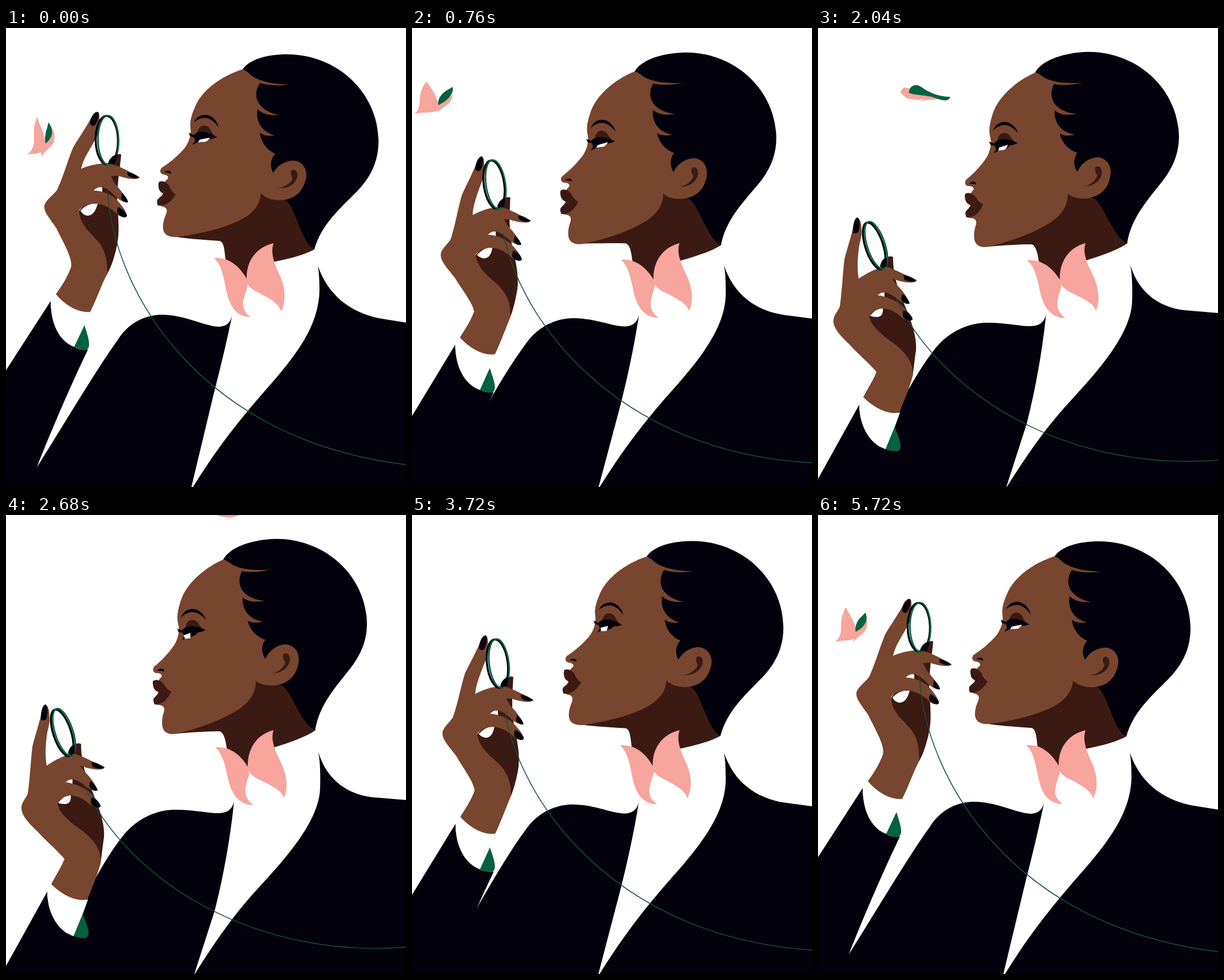
An HTML page that plays this animation: 698x802 px, repeating every 5760 ms.

```html
<!DOCTYPE html>
<html lang="en">
<head>
<meta charset="utf-8">
<title>Portrait with lens and butterfly</title>
<style>
  html, body { margin: 0; width: 100%; height: 100%; overflow: hidden; background: #fff; }
  svg { display: block; width: 698px; height: 802px; }
  .ink { fill: #02010c; }
  .skin { fill: #78452e; }
  .shade { fill: #3b1a14; }
  .pink { fill: #f7a59d; }
  .green { fill: #00623f; }
  .white { fill: #fff; }
  .cord { fill: none; stroke: #14503a; stroke-width: 1.5; }
  .rim { fill: none; }
</style>
</head>
<body>
<svg viewBox="0 0 698 802">
  <g id="body"></g>
  <g id="head">
    <path class="skin" d="M413 72C375 84 340 110 329 140C321 158 321 168 322 176C324 190 316 206 308 214C295 228 283 237 272 244C267 249 269 255 275 256C283 257 286 262 279 266C274 272 276 290 276 300C276 308 274 310 267 311C280 312 283 317 279 326C274 337 272 350 276 357C280 364 290 366 300 365C345 359 385 348 410 335C432 324 444 307 445 289L500 270L520 250L520 85L440 75Z"/>
    <path class="ink" d="M413 72C425 55 455 46 490 46C580 46 650 115 650 198C650 235 635 262 612 286C578 320 550 345 538 387C518 375 510 335 497 312C492 302 486 299 480 300L505 250L467 254C460 245 461 228 470 220C455 213 445 200 443 183C450 188 458 189 469 188C448 182 435 165 439 142C450 152 462 153 477 152C448 147 425 125 443 96C458 101 475 101 494 99C470 98 445 95 428 83C422 77 418 74 413 72Z"/>
    <path class="skin" d="M445 289L450 250L466 254C472 240 490 230 505 232C520 235 527 250 523 265C518 285 505 300 478 301C462 301 450 295 445 289Z"/>
    <path class="shade" d="M499 248C507 245 511 255 507 264C502 275 490 281 475 280C488 278 498 270 500 262C497 260 496 250 499 248Z"/>
    <path class="ink" d="M328 165C333 154 342 151 350 152C361 153 369 164 371 174C365 165 358 158 348 157C340 157 333 160 328 165Z"/>
    <path class="shade" d="M334 182C338 168 350 168 356 176C360 184 363 190 370 191C355 193 345 190 334 182Z"/>
    <path class="ink" d="M319 183L328 187C334 178 352 180 368 191C360 194 357 194 355 193C350 199 340 201 334 200L325 204L330 197L328 191L321 189Z"/>
    <path class="ink" d="M276 252C281 247 289 249 288 255C284 252 280 253 276 252Z"/>
    <path class="shade" d="M267 269C275 265 284 272 286 279C289 286 293 288 296 291C289 302 280 312 265 310C263 305 263 300 266 298C270 295 274 291 274 289C266 285 266 279 266 272Z"/>
    <g id="eye"></g>
  </g>
  <g id="bow"></g>
  <g id="fly"></g>
  <g id="hand"></g>
  <g id="lens">
    <ellipse class="rim" id="rimBack" stroke="#02010c" stroke-width="3.6" ry="42.5"/>
    <ellipse class="rim" id="rimFront" stroke="#00623f" stroke-width="2.7" cx="1.5" ry="43"/>
  </g>
  <g id="nails"></g>
</svg>
<script>
const LOOP = 5760;
const $ = id => document.getElementById(id);
const lerp = (a, b, k) => a + (b - a) * k;
const clamp = u => Math.max(0, Math.min(1, u));
const smooth = u => u * u * (3 - 2 * u);
const cubic = u => u < .5 ? 4 * u ** 3 : 1 - 4 * (1 - u) ** 3;
const ramp = (t, from, to) => cubic(clamp((t - from) / (to - from)));

// Blend two paths that share the same commands
function mix(a, b, k) {
  const nums = b.match(/-?[\d.]+/g);
  let i = 0;
  return a.replace(/-?[\d.]+/g, n => lerp(+n, +nums[i++], k).toFixed(2));
}

function addPath(layer, cls) {
  const el = document.createElementNS('http://www.w3.org/2000/svg', 'path');
  el.setAttribute('class', cls);
  $(layer).append(el);
  return el;
}

const parts = [];
function part(layer, cls, driver, raised, lowered) {
  parts.push({ el: addPath(layer, cls), driver, raised, lowered });
}

// Neck, running up behind jaw and hair
part('body', 'shade', 'head',
  'M285 363C330 340 400 310 445 280L500 290C515 320 525 350 538 387C520 397 490 404 465 409L421 440C405 420 390 412 383 404C381 385 380 373 372 372C345 370 310 368 285 363Z',
  'M298 382C335 350 400 320 437 280L490 285C515 320 525 350 540 376C525 387 495 398 465 407L422 440C405 420 390 415 385 407C383 390 379 380 373 378C350 378 320 380 298 382Z');
// Sleeve
part('body', 'ink', 'arm',
  'M0 598L78 477C78 520 95 548 119 557C127 562 134 563 143 562C122 605 75 710 40 804L0 804Z',
  'M0 788L72 658C72 692 88 726 118 736C126 739 134 739 142 739C132 760 120 785 110 804L0 804Z');
// Jacket, left and right of the shirt
part('body', 'ink', 'arm',
  'M20 820C80 730 145 615 195 545C215 513 245 501 273 501C315 502 345 521 372 522C385 521 392 515 395 500C386 545 375 590 363 637L323 804Z',
  'M60 830C95 760 150 630 200 566C226 530 263 515 295 515C330 515 350 521 370 521C385 521 395 515 398 500C392 560 380 630 364 692L328 804Z');
part('body', 'ink', 'arm',
  'M544 415C562 467 600 496 650 507L699 515L699 804L325 804C380 715 425 665 470 613C515 560 545 515 547 460C547 440 546 425 544 415Z',
  'M545 414C560 465 600 492 650 494L699 498L699 804L328 804C365 745 400 695 442 650C490 598 545 535 548 480C549 450 548 430 545 414Z');
// Cuff and cufflink
part('body', 'white', 'arm',
  'M78 476C78 520 95 548 119 557L137 519L147 496L87 465Z',
  'M72 656C72 692 88 726 118 736L134 697L143 672L79 645Z');
part('body', 'green', 'arm',
  'M137 519C140 530 146 545 145 555C144 559 143 561 140 563C132 563 125 560 119 557Z',
  'M134 697C137 707 144 720 144 730C144 736 142 738 139 739C131 740 124 738 118 736Z');
// Bow
part('bow', 'pink', 'head',
  'M363 402C387 400 406 414 420 438C423 447 422 451 420 456C414 476 407 490 427 505C405 505 392 490 386 465C380 440 378 415 363 402Z',
  'M365 406C389 404 408 417 422 440C425 449 425 452 423 457C417 477 412 492 432 507C410 507 396 492 389 467C383 442 380 418 365 406Z');
part('bow', 'pink', 'head',
  'M467 376C460 395 471 417 479 435C488 457 489 478 480 496C478 480 450 467 434 459C421 451 420 445 420 438C419 408 436 383 467 376Z',
  'M467 376C460 395 473 417 481 435C491 457 492 478 485 495C483 480 453 468 437 460C424 452 423 446 422 439C421 410 437 383 467 376Z');
// Eye white
part('eye', 'white', 'gaze',
  'M338 195L356 191.5C353 196 350 199 346 199L335 200Z',
  'M329 196L341 193C341 196 341 199 340 202L331 202Z');
// Thumb, finger gaps, hand
part('hand', 'shade', 'arm',
  'M180 236C185 226 194 218 201 221C199 245 194 270 194 300C196 340 200 360 190 395C186 410 182 420 176 431C178 400 165 378 150 362C135 348 128 334 127 320L160 280Z',
  'M109 416C113 405 122 396 131 400C131 425 135 440 143 465C158 500 176 540 170 570C168 585 167 595 165 609C163 580 140 555 122 545C105 535 92 522 88 505L112 470Z');
part('hand', 'white', 'arm',
  'M153 284C158 276 164 276 168 279L168 290C163 286 158 284 153 284Z',
  'M104 467C108 461 113 460 116 462L116 474C112 469 108 467 104 467Z');
part('hand', 'white', 'arm',
  'M130 319C140 308 152 305 160 307C157 318 152 328 142 328C136 327 132 323 130 319Z',
  'M91 503C98 494 106 489 113 490C114 497 112 504 104 505C98 505 94 504 91 503Z');
part('hand', 'skin', 'arm',
  'M87 465C100 447 108 433 113 419C118 405 100 375 88 350C75 331 67 322 67 313C66 303 82 293 89 283C100 260 107 233 117 209C125 195 141 172 148 158C152 149 157 145 161 147C165 151 162 165 162 178C161 186 157 193 154 198C146 213 135 228 131 246C145 240 165 235 182 237C200 242 218 252 233 261C230 266 212 264 198 259C192 257 186 260 183 258L190 272C198 281 206 290 213 304C208 306 200 302 194 297C186 289 175 278 166 278C160 278 156 281 153 284C165 284 180 289 190 297C200 307 208 317 211 327C211 333 203 331 196 327C183 314 170 307 155 307C143 307 132 311 127 319C129 342 145 357 160 372C172 386 178 405 176 431C165 452 160 470 147 496C125 498 103 484 87 465Z',
  'M79 645C88 628 97 614 102 601C92 588 70 570 55 553C38 537 28 525 27 514C26 503 34 496 38 487C42 460 43 430 46 405C49 392 57 367 61 350C64 335 67 331 70 332C76 336 76 348 76 360C75 368 73 375 72 380C69 400 68 420 71 438C85 428 104 418 120 417C139 424 156 433 172 441C170 447 152 445 138 441C134 438 131 440 129 437L135 446C146 457 155 468 160 481C156 483 146 480 140 475C131 467 122 462 115 462C110 462 107 465 104 467C117 468 130 474 142 481C153 491 162 501 165 508C165 513 156 511 149 508C135 495 125 491 113 490C103 491 94 495 89 503C93 522 112 537 135 553C155 570 167 585 165 609C158 633 150 652 142 672C122 676 98 664 79 645Z');
part('hand', 'cord', 'arm',
  'M177 280C185 460 340 720 698 763',
  'M135 470C215 644 440 776 698 755');
// Nails: index, middle, ring, little, thumb
part('hand', 'ink', 'arm',
  'M147 168C146 158 155 145 161 147C163 152 160 164 155 170C152 172 148 171 147 168Z',
  'M61 358C60 345 64 331 69 331C73 334 74 350 70 357C67 359 63 359 61 358Z');
part('nails', 'ink', 'arm',
  'M211 252C219 252 227 257 233 261C227 264 219 262 213 258Z',
  'M149 432C158 432 166 437 172 441C167 445 157 443 151 440Z');
part('nails', 'ink', 'arm',
  'M202 288C207 292 211 297 213 304C208 306 203 302 201 298Z',
  'M147 465C153 469 158 475 160 481C156 484 148 480 145 474Z');
part('nails', 'ink', 'arm',
  'M196 313C204 317 209 322 211 327C211 333 202 331 196 326C193 322 194 316 196 313Z',
  'M150 493C158 497 163 502 165 508C164 513 157 512 150 507C147 502 148 497 150 493Z');
part('nails', 'ink', 'arm',
  'M178 236C182 226 188 221 195 222C193 229 191 236 188 238Z',
  'M108 417C110 408 114 401 120 402C120 409 120 415 119 417Z');

// Butterfly wings: seen from the side, spread, flat; each about its own centre
const wings = [
  { cls: 'pink',
    side: 'M55 155C58 172 68 182 68 200C70 186 76 176 79 174C87 182 86 200 79 206C73 212 66 216 62 227C63 222 62 218 60 217C54 221 45 219 36 222C46 215 50 206 49 190C48 175 50 165 55 155Z',
    spread: 'M25 94C33 103 42 117 46 133C52 130 62 122 71 117C70 126 66 130 60 135C54 140 48 143 40 150C43 147 45 145 47 143C34 150 20 146 4 150C14 142 13 132 14 122C15 108 20 100 25 94Z',
    flat: 'M0 192C15 187 35 187 50 188C58 189 64 192 72 188C68 193 60 193 54 194C48 195 42 196 37 200C39 197 40 196 42 194C35 197 28 199 18 199C10 200 2 198 -4 197C-4 195 -2 193 0 192Z' },
  { cls: 'green',
    side: 'M74 165C82 174 82 186 77 193C74 198 71 200 69 202C67 194 69 186 70 180C72 175 73 170 74 165Z',
    spread: 'M71 103C73 112 67 120 60 126C55 131 50 132 46 135C44 127 49 119 54 114C60 109 66 106 71 103Z',
    flat: 'M91 187C90 200 70 193 55 190C35 188 18 194 6 190C4 174 18 170 28 177C45 187 70 192 91 187Z' }
];
const centre = { side: [61, 195], spread: [38, 125], flat: [42, 188] };
function centred(path, [cx, cy]) {
  let i = 0;
  return path.replace(/-?[\d.]+/g, n => n - (i++ % 2 ? cy : cx));
}
for (const w of wings) {
  for (const pose in centre) w[pose] = centred(w[pose], centre[pose]);
  w.el = addPath('fly', w.cls);
}

// Flight: time, x, y, tilt
const flight = [
  [0, 61, 195, 0], [400, 46, 152, 0], [760, 38, 125, 0], [1100, 32, 160, 0],
  [1400, 41, 187, 0], [1840, 118, 152, 10], [2400, 305, 50, 18], [2680, 389, -16, 20],
  [3000, 410, -60, 20], [3001, -90, 235, 0], [4840, -60, 230, 0],
  [5400, 18, 212, 0], [5720, 59, 196, 0], [5760, 61, 195, 0]
];
function place(t) {
  const i = Math.max(1, flight.findIndex(p => p[0] >= t));
  const a = flight[i - 1], b = flight[i];
  const k = (t - a[0]) / (b[0] - a[0]);
  return [1, 2, 3].map(n => lerp(a[n], b[n], k));
}

function draw(t) {
  const pose = {
    head: ramp(t, 0, 1300) - ramp(t, 2800, 4100),
    arm: ramp(t, 100, 1500) - ramp(t, 2940, 4340),
    gaze: ramp(t, 1840, 2300) - ramp(t, 3500, 4100)
  };
  for (const p of parts) p.el.setAttribute('d', mix(p.raised, p.lowered, pose[p.driver]));

  $('head').setAttribute('transform', `rotate(${-6.6 * pose.head} 445 369)`);

  const k = pose.arm;
  $('lens').setAttribute('transform',
    `translate(${lerp(177, 100, k)} ${lerp(196, 380, k)}) rotate(${lerp(-1, -18, k)})`);
  $('rimBack').setAttribute('rx', lerp(19.5, 15.5, k));
  $('rimBack').setAttribute('cx', lerp(-1, -2, k));
  $('rimFront').setAttribute('rx', lerp(18, 15.5, k));

  const [x, y, tilt] = place(t);
  const turn = clamp(Math.min(t / 760, (LOOP - t) / 80));
  const flap = smooth((1 - Math.cos(t / 384 * 2 * Math.PI)) / 2);
  $('fly').setAttribute('transform', `translate(${x} ${y}) rotate(${tilt})`);
  for (const w of wings) w.el.setAttribute('d', mix(mix(w.side, w.spread, turn), w.flat, flap));
}

const start = performance.now();
function tick() {
  draw((performance.now() - start) % LOOP);
  requestAnimationFrame(tick);
}
draw(0);
requestAnimationFrame(tick);
</script>
</body>
</html>
```
